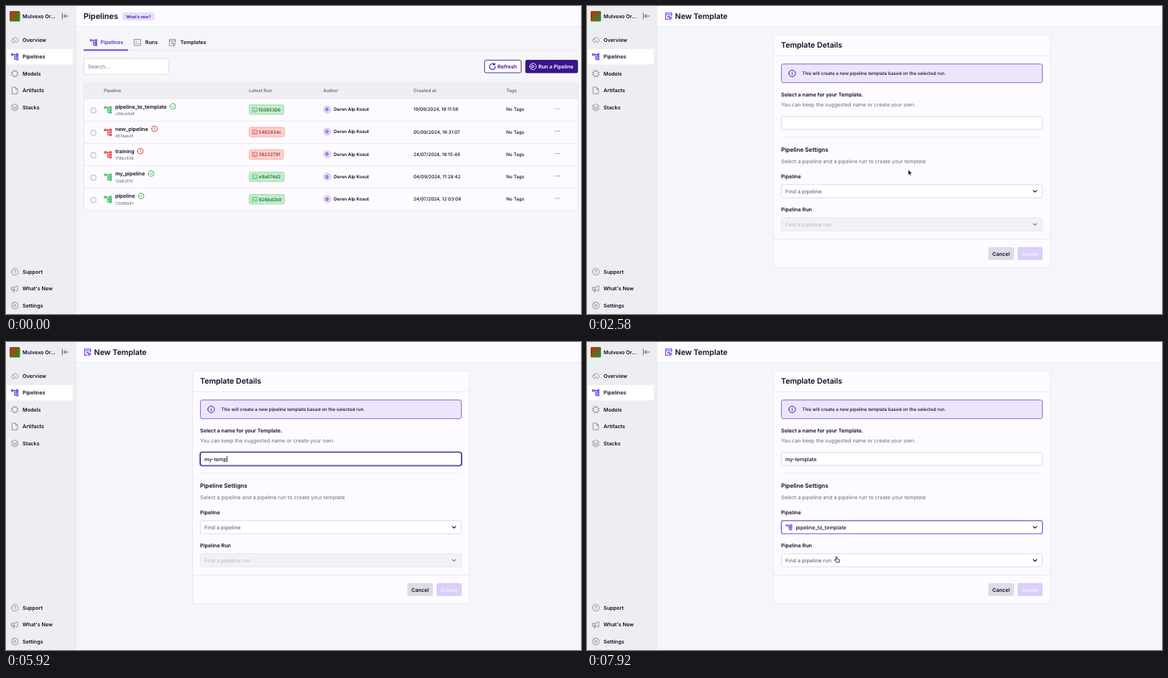
Animation of 800 by 429 pixels, one loop 8 s. Source, as an HTML page:

```html
<!DOCTYPE html>
<html lang="en">
<head>
<meta charset="utf-8">
<title>Pipeline templates</title>
<style>
  html, body { margin: 0; width: 100%; height: 100%; overflow: hidden; background: #f5f6fa; }
  svg { display: block; width: 100%; height: 100%; }
  text { font-family: Inter, "Noto Sans", sans-serif; text-rendering: geometricPrecision; white-space: pre; }
</style>
</head>
<body>
<svg id="stage" viewBox="0 0 800 429"></svg>
<script>
const INK = '#120a24', GREY = '#6a6d78', PURPLE = '#6d3be8', DEEP = '#3a148c';
const LINE = '#e3e4eb', PAPER = '#fdfbff', GREEN = '#2fb95a', RED = '#d8413a';
const LOOP = 8000;

// Text is placed by the middle of its capitals.
const text = (x, y, str, size = 7.2, weight = 600, fill = INK, anchor = 'start', id = '') =>
  `<text ${id && `id="${id}"`} x="${x}" y="${(y + size * .364).toFixed(2)}" font-size="${size}" font-weight="${weight}" fill="${fill}" text-anchor="${anchor}">${str}</text>`;
const rect = (x, y, w, h, fill, r = 0, stroke = 'none', extra = '') =>
  `<rect x="${x}" y="${y}" width="${w}" height="${h}" rx="${r}" fill="${fill}" stroke="${stroke}" ${extra}/>`;
const circle = (x, y, r, fill, stroke = 'none') =>
  `<circle cx="${x}" cy="${y}" r="${r}" fill="${fill}" stroke="${stroke}"/>`;
const path = (d, stroke, width = .9, fill = 'none') =>
  `<path d="${d}" fill="${fill}" stroke="${stroke}" stroke-width="${width}" stroke-linecap="round" stroke-linejoin="round"/>`;
const group = (id, body) => `<g id="${id}">${body}</g>`;

const ring = r => `M${-r} 0a${r} ${r} 0 1 1 ${2 * r} 0a${r} ${r} 0 1 1 ${-2 * r} 0z`;
const ICONS = {
  overview: 'M-3-1A3.6 3.6 0 0 1 3.6-1A2.3 2.3 0 0 1 3.2 3H1M-1.8 4.3L-4.8 1.5L-3-1.3L0 1.5Z',
  pipelines: 'M-4.7-4h2.2v2h-2.2zM2-4h2.4v1.8H2zM2-.7h2.4v1.8H2zM2 2.6h2.4v1.8H2zM-2.5-3H2M-.4-3V3.5H2M-.4 .2H2',
  models: 'M-2-3.5H2L3.5-2V2L2 3.5H-2L-3.5 2V-2ZM-1.6-3.5V-4.8M1.6-3.5V-4.8M-1.6 3.5V4.8M1.6 3.5V4.8M-3.5-1.6H-4.8M-3.5 1.6H-4.8M3.5-1.6H4.8M3.5 1.6H4.8',
  artifacts: 'M-3.4-4.6H1L3.6-2V4.6H-3.4ZM1-4.6V-2H3.6',
  stacks: 'M0-4.7L4.6-2.2L0 .3L-4.6-2.2ZM-4.6 .2L0 2.6L4.6 .2M-4.6 2.4L0 4.8L4.6 2.4',
  support: ring(4.7) + 'M-1.4-1.2C-1.2-3 1.6-2.8 1.4-1C1.3 0 0-.1 0 1M0 2.5V2.6',
  news: 'M-4.6-1.8H-1L4-4V3.4L-1 1.4H-4.6ZM-3.4 1.5L-2.6 4.4H-.8V1.5M-1-1.8V1.4',
  settings: 'M-1.4-4.7H1.4L1.9-3.3L3.4-3.6L4.7-1.2L3.7 0L4.7 1.2L3.4 3.6L1.9 3.3L1.4 4.7H-1.4L-1.9 3.3L-3.4 3.6L-4.7 1.2L-3.7 0L-4.7-1.2L-3.4-3.6L-1.9-3.3Z' + ring(1.5),
  runs: 'M-4.4-4.2H4.4V4.2H-4.4ZM-2.4-1.5L-1-.2L-2.4 1.1M0 1.7H2.2',
  templates: 'M-.5 4.4H-4.2V-4.2H4.2V0M-4.2-2H4.2M-1.2 1.5A1 1 0 1 1 .6 .6M.5 1L4.6 2.5L2.8 3.2L2 5Z',
  check: ring(4) + 'M-1.7 .1L-.5 1.3L1.8-1.1',
  alert: ring(4) + 'M0-1.9V.3M0 1.8V1.9',
  info: ring(4.6) + 'M0-.3V2.2M0-2.1V-2',
  play: ring(4.4) + 'M-1.2-1.9L2 0L-1.2 1.9Z',
  refresh: 'M4.2-.2A4.2 4.2 0 1 1 2.6-3.3M3.3-5V-2.6H.9',
  plus: 'M-3.2 0H3.2M0-3.2V3.2',
  down: 'M-2.4-1.2L0 1.2L2.4-1.2',
  collapse: 'M-4-4V4M4.4 0H-2M.6-2.6L-2 0L.6 2.6'
};
const icon = (name, x, y, color, scale = 1, width = .9) =>
  `<g transform="translate(${x} ${y}) scale(${scale})">${path(ICONS[name], color, width)}</g>`;

function sidebar() {
  const items = [
    ['Overview', 'overview', 47], ['Pipelines', 'pipelines', 70.6], ['Models', 'models', 94.2],
    ['Artifacts', 'artifacts', 117.7], ['Stacks', 'stacks', 141.3],
    ['Support', 'support', 370.2], ["What's New", 'news', 393.7], ['Settings', 'settings', 417.3]
  ];
  return rect(0, 0, 97.5, 429, '#edeef2') +
    rect(97.5, 0, 702.5, 28.5, PAPER) + rect(97.5, 28, 702.5, .8, LINE) +
    rect(97, 0, .6, 429, '#e6e7ed') +
    rect(5, 7, 14.5, 14.5, 'url(#avatar)', 1.5) +
    text(23, 14, 'Mulvexo Or...') + icon('collapse', 82.3, 14, '#454852') +
    rect(1.5, 60, 91.5, 21.5, '#fff', 2.5) +
    items.map(([label, name, y]) =>
      icon(name, 12.3, y, name === 'pipelines' ? PURPLE : '#7c808c', 1, name === 'pipelines' ? 1.1 : .8) +
      text(23, y, label)).join('');
}

function tabs(active) {
  const list = [['Pipelines', 'pipelines', 122, 108, 62], ['Runs', 'runs', 183, 170, 49], ['Templates', 'templates', 231.5, 219, 66.5]];
  return text(108, 14, 'Pipelines', 10.9) + rect(162, 9, 44.5, 11, '#e6dcfb', 2) +
    text(184.2, 14.5, "What's new?", 5.5, 600, DEEP, 'middle') +
    rect(108, 61.6, 688, .8, LINE) +
    list.map(([label, name, x, ux, w], i) => {
      const on = i === active;
      return icon(name, x, 50.8, on ? PURPLE : '#70747f', 1, on ? 1.1 : .8) +
        text(ux + (i === 1 ? 23.7 : 23.5), 50.8, label, 7.2, 600, on ? '#5b34d6' : INK) +
        (on ? rect(ux, 60.4, w, 1.9, PURPLE) : '');
    }).join('');
}

function listPage() {
  const rows = [
    ['pipeline_to_template', 'c68ce0d8', 'f0385306', '19/09/2024, 19:11:58', 1, 232.3, 48],
    ['new_pipeline', '4514eb4f', '5482934c', '05/09/2024, 16:31:07', 0, 206.7, 49],
    ['training', '178bc839', '3923278f', '24/07/2024, 18:15:49', 0, 187, 47.5],
    ['my_pipeline', '12b63f75', 'e9a674d2', '04/09/2024, 11:28:42', 1, 202, 48.5],
    ['pipeline', '72d16947', '928bd2b0', '24/07/2024, 12:03:08', 1, 188, 49]
  ];
  const heads = [[136, 'Pipeline'], [338, 'Latest Run'], [441.3, 'Author'], [567, 'Created at'], [696, 'Tags']];
  const row = ([name, hash, run, date, ok, badge, chip], i) => {
    const y = 144.4 + i * 31.2, color = ok ? GREEN : RED, dark = ok ? '#1f5a31' : '#86302d';
    return (i ? rect(108, y - 15.8, 688, .8, LINE) : '') +
      rect(118.2, y - 2.3, 6.8, 6.8, '#fff', 1.6, '#9a9da8', 'stroke-width=".8"') +
      icon('pipelines', 142, y + .2, color, 1.05, 1.1) +
      text(152, y - 4.4, name) + text(152, y + 5.6, hash, 5.6, 400, '#5d606b') +
      icon(ok ? 'check' : 'alert', badge, y - 4.6, color, .97, 1) +
      rect(338.4, y - 6.6, chip, 13.2, ok ? '#c3eecd' : '#fdd0ce', 2.2, ok ? '#86d69c' : '#f0a09c', 'stroke-width=".8"') +
      icon('runs', 346.3, y, color, .68, 1.1) + text(351.6, y, run, 6.35, 500, dark) +
      circle(446.8, y - .4, 5.6, '#dccffa') + text(446.8, y - .4, 'D', 5.4, 600, DEEP, 'middle') +
      text(456, y - .4, 'Deren Alp Kosut', 6.3) +
      text(567, y - .4, date, 6.35, 500) + text(696, y - .4, 'No Tags', 6.35, 500) +
      [-2.8, 0, 2.8].map(dx => circle(767 + dx, y - 1.3, .7, '#70747f')).join('');
  };
  return tabs(0) +
    rect(108.4, 73.2, 118.2, 22, '#fff', 2.5, '#d5d7df', 'stroke-width=".8"') +
    text(114, 84.4, 'Search...', 7.3, 400, '#70747f') +
    rect(665.8, 75.4, 51, 17.6, PAPER, 2.5, DEEP, 'stroke-width=".9" id="refresh"') +
    icon('refresh', 676.8, 84.4, DEEP, .98, 1.1) + text(683.8, 84.4, 'Refresh', 7.2, 600, DEEP) +
    rect(722.5, 75, 73.3, 18.4, DEEP, 2.5) + icon('play', 733.2, 84.3, '#fff', 1, .9) +
    text(740.7, 84.4, 'Run a Pipeline', 7.2, 600, '#fff') +
    rect(108.4, 107.2, 687.2, 177.6, PAPER, 2.5) +
    rect(108.4, 107.2, 687.2, 22, '#eeeff4', 2.5) + rect(108, 128.6, 688, .8, LINE) +
    heads.map(([x, s]) => text(x, 117.8, s, 6.3, 600, GREY)).join('') +
    rows.map(row).join('') +
    rect(108.4, 107.2, 687.2, 177.6, 'none', 2.5, LINE, 'stroke-width=".8"');
}

function emptyPage() {
  return tabs(2) +
    path('M411 127.4H493', '#9a78f0', .9) + path('M418 129.4H486', '#7fd39b', .9) +
    rect(426.2, 103.4, 54, 45, '#d9cbfa', 2) +
    rect(424.8, 102, 54, 45, PAPER, 2, '#8757ee', 'stroke-width=".9"') +
    rect(425.3, 102.5, 53, 4.6, '#efe8fd', 1.5) + path('M424.8 107.2H478.6', '#8757ee', .7) +
    [429, 431.6, 434.2].map(x => circle(x, 104.7, .75, PURPLE)).join('') +
    circle(451.6, 125.4, 15.6, '#e6dcfb') + icon('templates', 451.6, 125.4, PURPLE, 1.55, .95) +
    text(451.6, 166.8, 'No Run Templates Available', 10.6, 600, INK, 'middle') +
    text(451.6, 191.2, 'It looks like there are no run templates created yet.', 8.2, 400, '#4f525d', 'middle') +
    text(451.6, 203.8, 'Create a new template to get started.', 8.2, 400, '#4f525d', 'middle') +
    rect(414, 221.2, 75.8, 18.4, DEEP, 2.5) + icon('plus', 424.6, 230.4, '#fff', .95, 1) +
    text(433.8, 230.4, 'New Template', 7.2, 600, '#fff');
}

function formPage() {
  const box = (y, id = '') => rect(270.4, y, 363.2, 18.2, '#fff', 2.5, '#d0d2db', `stroke-width=".8" ${id && `id="${id}"`}`);
  const options = ['No Pipeline', 'pipeline_to_template', 'new_pipeline', 'training', 'my_pipeline', 'pipeline'];
  return icon('templates', 113.6, 14, PURPLE, 1, 1.1) + text(122.6, 14, 'New Template', 10.6) +
    rect(259.6, 40.6, 385, 324, PAPER, 2.5, LINE, 'stroke-width=".8"') +
    text(270, 54.6, 'Template Details', 10.6) + rect(259.6, 69.2, 385, .8, LINE) +
    rect(270.5, 80.8, 363, 26, '#ece6fd', 2.5, '#7a55d0', 'stroke-width=".9"') +
    icon('info', 285.4, 93.8, DEEP, 1, .95) +
    text(299.3, 93.8, 'This will create a new pipeline template based on the selected run.', 6.3, 500) +
    text(270, 123.3, 'Select a name for your Template.') +
    text(270, 137.8, 'You can keep the suggested name or create your own.', 7.25, 400, GREY) +
    rect(269.4, 152.8, 365.2, 20.2, 'none', 3.2, '#7d8df0', 'stroke-width="1" id="halo"') +
    box(153.8, 'field') + text(276, 163, '', 7.2, 500, INK, 'start', 'typed') +
    rect(0, 158.6, .8, 9, INK, 0, 'none', 'id="caret"') +
    rect(270, 182.6, 364, .8, LINE) +
    text(270, 200.3, 'Pipeline Settigns', 8.15) +
    text(270, 216, 'Select a pipeline and a pipeline run to create your template', 7.28, 400, GREY) +
    text(270, 237.8, 'Pipeline', 7.2) + box(248.8, 'select') +
    text(276, 258, 'Find a pipeline', 7.3, 500, GREY, 'start', 'hint') +
    group('chosen', icon('pipelines', 281.4, 258, PURPLE, .85, 1.1) + text(290.4, 258, options[1], 7.2, 500)) +
    icon('down', 623.3, 258, INK, 1, 1.2) +
    text(270, 283.8, 'Pipeline Run', 7.2) + box(294.9, 'run') +
    text(276, 304.2, 'Find a pipeline run', 7.3, 500, GREY, 'start', 'runHint') +
    group('runArrow', icon('down', 623.3, 304.2, INK, 1, 1.2)) +
    rect(259.6, 324.2, 385, .8, LINE) +
    rect(558.4, 335.8, 35.6, 18, '#dcdde4', 2.5) + text(576, 345, 'Cancel', 7.2, 600, INK, 'middle') +
    rect(599, 335.8, 35, 18, '#dacefb', 2.5) + text(616.4, 345, 'Create', 7.2, 600, '#f6f1ff', 'middle') +
    group('menu',
      rect(271.6, 272, 362.4, 116, '#1a103018', 3) +
      rect(271.4, 271.2, 362.2, 115.4, PAPER, 3, '#dfe0e8', 'stroke-width=".8"') +
      rect(275, 275, 355, 18, '#efeef2', 1.5, 'none', 'id="hover"') +
      options.map((s, i) => icon('pipelines', 285.6, 284 + i * 18, PURPLE, .85, 1.1) +
        text(295, 284 + i * 18, s, 7.2, 500)).join(''));
}

const pointers =
  group('arrow', path('M0 0V7.4L1.7 5.9L2.8 8.4L4 7.9L2.9 5.4H5.2Z', '#fff', .6, '#000')) +
  group('hand', path('M-.8 .6C-.8-.5 .8-.5 .8 .6V3L3.4 3.5C4.4 3.7 4.6 4.2 4.5 5L4 7.8H-.2L-2.4 5C-2.9 4.2-2 3.6-1.4 4.2L-.8 4.8Z', '#000', .8, '#fff')) +
  group('beam', path('M-1.4-3.8Q0-3.8 0-3Q0-3.8 1.4-3.8M0-3V3M-1.4 3.8Q0 3.8 0 3Q0 3.8 1.4 3.8', '#000', .7));

document.getElementById('stage').innerHTML =
  `<defs><linearGradient id="avatar" x1="0" y1="0" x2="1" y2=".8"><stop offset="0" stop-color="#c52a18"/><stop offset=".5" stop-color="#7d5a14"/><stop offset="1" stop-color="#1f8f2a"/></linearGradient></defs>` +
  rect(0, 0, 800, 429, '#f5f6fa') + sidebar() +
  group('list', listPage()) + group('empty', emptyPage()) + group('form', formPage()) +
  group('cursor', pointers);

const $ = id => document.getElementById(id);
const show = (id, on) => $(id).setAttribute('display', on ? 'inline' : 'none');
const set = (id, attrs) => { for (const k in attrs) $(id).setAttribute(k, attrs[k]); };
const clamp = v => Math.max(0, Math.min(1, v));
const within = (t, a, b) => t >= a && t < b;
const mix = (a, b, k) => `rgb(${a.map((v, i) => Math.round(v + (b[i] - v) * k))})`;

const NAME = 'my-template';
const KEYS = [4580, 4750, 5000, 5250, 5420, 5580, 5800, 6000, 6170, 6330, 6500];
const EMPTY = 1400, FORM = 2200, FOCUS = 4170, OPEN = 7080, PICK = 7600;

// time, x, y
const ROUTE = [
  [580, 800, 150], [820, 690, 82], [1000, 391, 56], [1110, 305, 51], [1250, 260, 49], [1430, 260, 49],
  [1520, 278, 64], [1750, 395, 164], [1920, 437, 197], [2080, 447, 228], [2900, 447, 228],
  [3200, 420, 208], [3500, 366, 177], [3670, 353, 171], [3830, 353, 171], [4020, 353, 162],
  [6700, 353, 162], [6820, 353, 200], [6980, 352, 250], [7200, 352, 250], [7340, 350, 276], [7480, 347, 299], [LOOP, 347, 299]
];
function place(t) {
  const i = Math.max(1, ROUTE.findIndex(p => p[0] > t));
  const [a, b] = [ROUTE[i - 1], ROUTE[i]], k = clamp((t - a[0]) / (b[0] - a[0]));
  return [a[1] + (b[1] - a[1]) * k, a[2] + (b[2] - a[2]) * k];
}

function update(t) {
  show('list', t < EMPTY);
  show('empty', within(t, EMPTY, FORM));
  show('form', t >= FORM);

  const lit = clamp((t - 780) / 60) * clamp((1240 - t) / 300);
  set('refresh', { fill: mix([253, 251, 255], [230, 223, 253], lit) });

  const count = KEYS.filter(k => k <= t).length;
  const focused = within(t, FOCUS, OPEN);
  const glow = focused ? clamp((t - FOCUS) / 120) : t >= OPEN ? clamp((OPEN + 200 - t) / 200) : 0;
  $('typed').textContent = NAME.slice(0, count);
  set('field', { stroke: mix([208, 210, 219], [32, 26, 92], glow), 'stroke-width': focused ? 1.1 : .8 });
  set('halo', { opacity: focused ? glow : 0 });
  const since = t - (count ? KEYS[count - 1] : FOCUS);
  show('caret', focused && since % 1000 < 500);
  if (focused) set('caret', { x: 276.2 + (count ? $('typed').getComputedTextLength() : 0) });

  const picked = t >= PICK;
  show('hint', !picked);
  show('chosen', picked);
  set('select', { stroke: picked ? '#6d4fe0' : '#d0d2db', 'stroke-width': picked ? 1.2 : .8 });
  set('run', { fill: picked ? '#fff' : '#f0f2f5', stroke: picked ? '#d0d2db' : '#dfe1e7' });
  set('runHint', { fill: picked ? GREY : '#bcc0c9' });
  set('runArrow', { opacity: picked ? 1 : .45 });

  const menu = clamp((t - OPEN) / 97) * clamp((PICK + 80 - t) / 80);
  show('menu', menu > 0);
  set('menu', { opacity: menu });
  set('hover', { y: t < 7440 ? 275 : 293 });

  const [x, y] = place(t);
  const beam = within(t, 3930, 4580) || within(t, 6700, 6760);
  const hand = within(t, 740, 850) || within(t, 1130, 1450) || within(t, 2040, FORM + 60) || t >= 7320;
  show('cursor', within(t, 580, 4580) || t >= 6700);
  show('beam', beam);
  show('hand', hand);
  show('arrow', !beam && !hand);
  set('cursor', { transform: `translate(${x.toFixed(2)} ${y.toFixed(2)})` });
}

const start = performance.now();
function tick(now) {
  update(Math.max(0, now - start) % LOOP);
  requestAnimationFrame(tick);
}
update(0);
requestAnimationFrame(tick);
</script>
</body>
</html>
```
